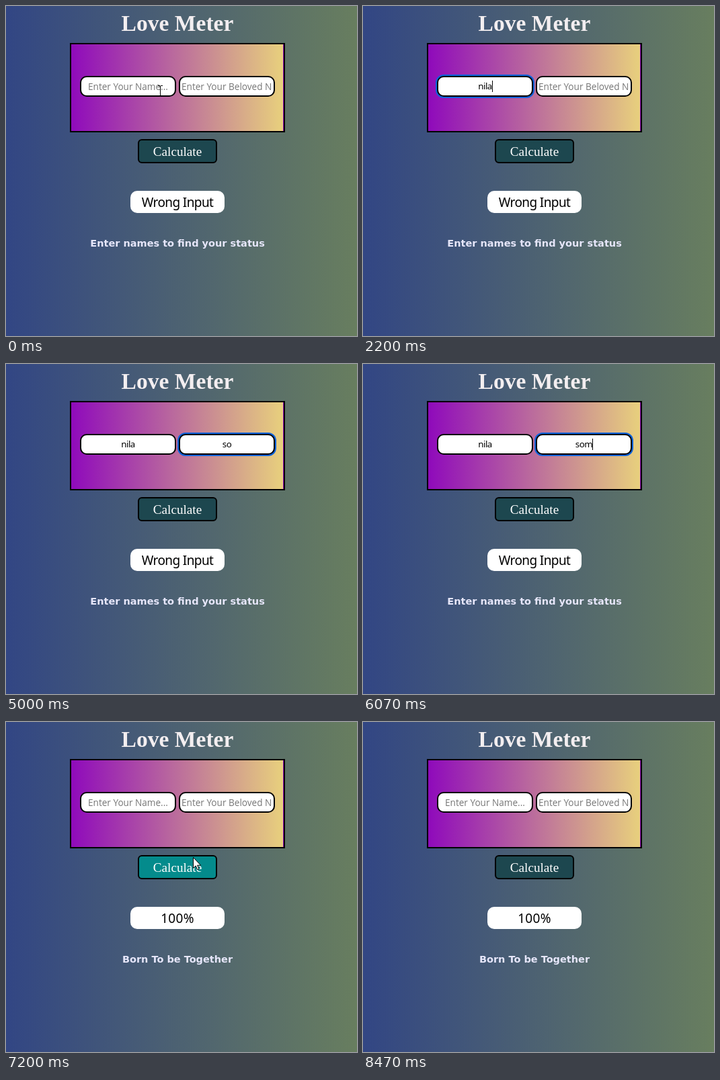
These frames come from a looping animation (522 px wide and 491 px high, 9.07 s). An HTML page:

```html
<!DOCTYPE html>
<html lang="en">
<head>
<meta charset="utf-8">
<title>Love Meter</title>
<style>
  html, body { margin: 0; width: 100%; height: 100%; overflow: hidden; }
  body { position: relative; background: linear-gradient(90deg, #324684, #687e5f); }
  body * { box-sizing: border-box; }
  h1, .panel, .field, .button, .result, .status, .hint, .value, svg { position: absolute; margin: 0; }
  h1, .button, .result, .status, .hint, .value { text-align: center; white-space: pre; }
  h1 { left: 0; top: 6px; width: 510px; font: bold 33.6px/40px "Liberation Serif", serif; color: #f3eef0; }
  .panel {
    left: 95px; top: 55px; width: 320px; height: 133px; border: 2px solid #000;
    background: linear-gradient(90deg, #8f0abb, #e8d07d) 0 0 / 315px 100%;
  }
  .field {
    top: 104px; width: 143px; height: 31px; border: 2px solid #000; border-radius: 10px;
    background: #fff; font: 13.6px/27px "Open Sans", sans-serif;
  }
  #you { left: 110px; }
  #beloved { left: 257px; }
  .field.focus { box-shadow: 0 0 0 2px #0b62dc; }
  .hint { inset: 0 2px; overflow: hidden; color: #757575; }
  #beloved .hint { text-align: left; }
  .value { inset: 0; font: 13.33px/27px "Noto Sans", sans-serif; letter-spacing: -.5px; color: #000; }
  .caret .value::after {
    content: ""; display: inline-block; width: 1px; height: 17px; margin-right: -1px;
    vertical-align: -4px; background: #000;
  }
  .button {
    left: 196px; top: 198px; width: 118px; height: 36px; border: 2px solid #000; border-radius: 6px;
    background: #1d474f; color: #fff; font: 19.2px/34px "Liberation Serif", serif;
  }
  .button.hover { background: #048b8c; }
  .result {
    left: 185px; top: 275px; width: 140px; height: 33px; border-radius: 10px;
    background: #fff; color: #000; font: 19px/34px "Noto Sans", sans-serif; letter-spacing: -.6px;
  }
  .result.score { letter-spacing: .3px; }
  .status { left: 0; top: 343px; width: 510px; font: bold 14.5px/21px "DejaVu Sans", sans-serif; color: #e6e6fa; }
  svg { left: 0; top: 0; overflow: visible; }
</style>
</head>
<body>
<h1>Love Meter</h1>
<div class="panel"></div>
<div class="field" id="you"><div class="hint">Enter Your Name...</div><div class="value"></div></div>
<div class="field" id="beloved"><div class="hint">Enter Your Beloved Name...</div><div class="value"></div></div>
<div class="button">Calculate</div>
<div class="result"></div>
<div class="status"></div>
<svg id="beam" width="7" height="16"><path d="M0 .5h3m1 0h3M3.5 1v14M0 15.5h3m1 0h3" fill="none" stroke="#000"/></svg>
<svg id="arrow" width="12" height="19"><path d="M.5 .5v16l3.7-3.5 2.5 5.6 2.3-1-2.4-5.4h5z" fill="#fff" stroke="#000"/></svg>
<script>
const LOOP = 9070, EXIT = 7870, END = 8470;
const $ = s => document.querySelector(s);
const fields = [$('#you'), $('#beloved')];
const button = $('.button'), result = $('.result'), status = $('.status');
const pointers = { beam: $('#beam'), arrow: $('#arrow') };

const beam = (x, y) => ({ pointer: ['beam', x, y] });
const arrow = (x, y, hover = false) => ({ pointer: ['arrow', x, y], hover });
const type = (key, text, caret = true) => ({ [key]: text, caret });
const on = { caret: true }, off = { caret: false }, none = { pointer: null };

// Each step changes part of the state and holds until the next one.
const steps = [
  [0, { you: '', beloved: '', focus: -1, caret: false, hover: false, done: false, ...beam(226, 118) }],
  [70, beam(203, 109)],
  [130, beam(191, 106)],
  [470, { focus: 0, caret: true }],
  [1000, off],
  [1470, on],
  [1530, { ...type('you', 'n'), ...none }],
  [1670, type('you', 'ni')],
  [2000, type('you', 'nil')],
  [2200, type('you', 'nila')],
  [2530, off],
  [3000, on],
  [3070, beam(318, 103)],
  [3130, beam(358, 102)],
  [3530, off],
  [3600, beam(354, 104)],
  [3670, beam(348, 107)],
  [3930, { focus: 1, caret: true }],
  [4470, off],
  [4670, on],
  [4730, { ...type('beloved', 's'), ...none }],
  [4870, type('beloved', 'so')],
  [5000, off],
  [5330, type('beloved', 'som')],
  [5530, off],
  [6070, on],
  [6400, beam(344, 112)],
  [6600, { ...off, ...beam(330, 127) }],
  [6670, arrow(299, 182)],
  [6730, arrow(285, 195)],
  [6800, arrow(280, 199, true)],
  [6870, arrow(278, 201, true)],
  [7070, { focus: -1 }],
  [7200, { you: '', beloved: '', done: true }],
  [END, { ...none, hover: false }]
];

function stateAt(t) {
  const s = Object.assign({}, ...steps.filter(([at]) => at <= t).map(([, change]) => change));
  if (t >= EXIT && t < END) {
    const p = (Math.floor((t - EXIT) / 66.7) + 1) / 10;
    const x = 278 - 159 * p, y = 201 + 290 * p ** 1.4;
    s.pointer = ['arrow', Math.round(x), Math.round(y)];
    s.hover = y < 234;
  }
  return s;
}

function setText(el, text) {
  if (el.textContent !== text) el.textContent = text;
}

function draw(t) {
  const s = stateAt(t);
  fields.forEach((field, i) => {
    const text = s[field.id], focused = s.focus === i;
    field.classList.toggle('focus', focused);
    field.classList.toggle('caret', focused && s.caret);
    field.firstChild.hidden = text !== '';
    setText(field.lastChild, text);
  });
  button.classList.toggle('hover', s.hover);
  result.classList.toggle('score', s.done);
  setText(result, s.done ? '100%' : 'Wrong Input');
  setText(status, s.done ? 'Born To be Together' : 'Enter names to find your status');
  for (const [name, el] of Object.entries(pointers)) {
    const shown = s.pointer && s.pointer[0] === name;
    el.style.display = shown ? '' : 'none';
    if (shown) el.style.transform = `translate(${s.pointer[1]}px, ${s.pointer[2]}px)`;
  }
}

const start = performance.now();
function tick() {
  draw((performance.now() - start) % LOOP);
  requestAnimationFrame(tick);
}
tick();
</script>
</body>
</html>
```
